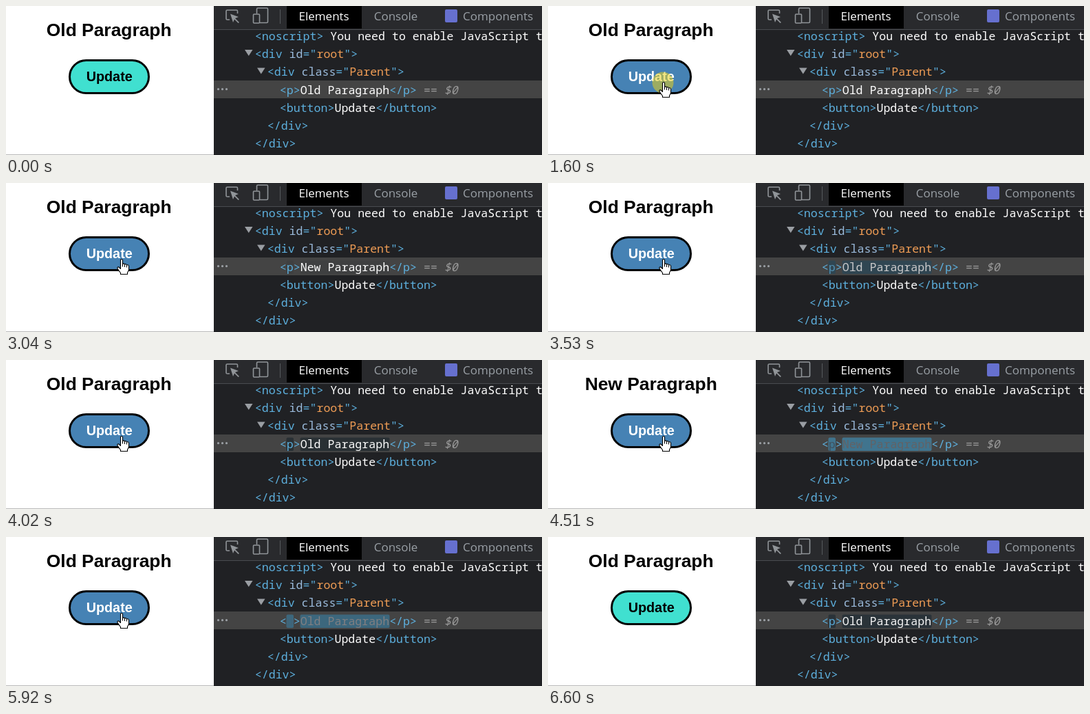
Write an HTML page that moves like this. It is 779 by 218 pixels and loops after 6670 ms.

```html
<!DOCTYPE html>
<html lang="en">
<head>
<meta charset="utf-8">
<title>Paragraph update</title>
<style>
  html, body { margin: 0; width: 100%; height: 100%; overflow: hidden; background: #fff; }
  svg { display: block; width: 779px; height: 218px; }
  text { white-space: pre; }
  .page { font-family: "Liberation Sans", Arial, sans-serif; font-weight: 700; text-anchor: middle; }
  .tab { font: 17px "Open Sans", "Noto Sans", sans-serif; fill: #9aa0a6; }
  .code { font: 16.6px "Noto Sans Mono", "DejaVu Sans Mono", monospace; fill: #fff; }
  .tag { fill: #5db0de; }
  .attr { fill: #9bbbdc; }
  .val { fill: #f09d55; }
  .dim { fill: #9a9a9a; }
  .icon { fill: none; stroke: #919599; stroke-width: 1.6; }
</style>
</head>
<body>
<svg viewBox="0 0 779 218">
  <rect width="779" height="218" fill="#fff"/>
  <rect y="217" width="302" height="1" fill="#b8b8b8"/>
  <text id="heading" class="page" x="149.7" y="44" font-size="26.4">Old Paragraph</text>
  <rect id="button" x="92.5" y="79.5" width="115" height="48" rx="24" stroke="#000" stroke-width="3"/>
  <text id="label" class="page" x="150.2" y="110" font-size="19.8">Update</text>

  <g id="tools">
    <rect x="302" width="477" height="218" fill="#202124"/>
    <rect x="302" width="477" height="34" fill="#292a2d"/>
    <rect x="302" y="34" width="477" height="1" fill="#494c50"/>
    <rect x="408" width="109" height="33" fill="#000"/>
    <g class="icon">
      <path d="M325 20H321.5Q320 20 320 18.5V7.5Q320 6 321.5 6H335Q336.5 6 336.5 7.5V11"/>
      <path d="M326 11.5L338 16L333 18L339 24L337.5 25L332 19.5L330 24Z" fill="#919599" stroke="none"/>
      <path d="M364.5 11V4.5Q364.5 3 366 3H379Q380.5 3 380.5 4.5V23Q380.5 24.5 379 24.500H369"/>
      <rect x="359.5" y="12" width="9" height="13" rx="1"/>
    </g>
    <rect x="398" y="5" width="1" height="21" fill="#55585c"/>
    <rect x="638" y="5" width="18" height="19" rx="2" fill="#6670cf"/>
    <text class="tab" x="425.5" y="21" style="fill:#fff">Elements</text>
    <text class="tab" x="534.7" y="21">Console</text>
    <text class="tab" x="664" y="21">Components</text>

    <rect x="302" y="109" width="477" height="26" fill="#444"/>
    <g fill="#9a9ea3">
      <circle cx="308.5" cy="121.7" r="1.6"/>
      <circle cx="314.5" cy="121.7" r="1.6"/>
      <circle cx="320.5" cy="121.7" r="1.6"/>
      <path d="M347 64H358.5L352.75 73Z"/>
      <path d="M365 90.500H376.5L370.75 99.5Z"/>
    </g>
    <g id="flash">
      <rect x="407.5" y="113.5" width="10.5" height="19.5" rx="2"/>
      <rect x="427.5" y="113.5" width="130" height="19.5" rx="2"/>
    </g>
    <g class="code">
      <text x="361.8" y="50"><tspan class="tag">&lt;noscript&gt;</tspan> You need to enable JavaScript to run</text>
      <text x="361.8" y="76" class="tag">&lt;div <tspan class="attr">id</tspan>="<tspan class="val">root</tspan>"&gt;</text>
      <text x="379.8" y="102" class="tag">&lt;div <tspan class="attr">class</tspan>="<tspan class="val">Parent</tspan>"&gt;</text>
      <text x="397.8" y="129"><tspan class="tag">&lt;</tspan><tspan id="name">p</tspan><tspan class="tag">&gt;</tspan><tspan id="node">Old Paragraph</tspan><tspan class="tag">&lt;/p&gt;</tspan><tspan class="dim"> == </tspan><tspan class="dim" font-style="italic">$0</tspan></text>
      <text x="397.8" y="155"><tspan class="tag">&lt;button&gt;</tspan>Update<tspan class="tag">&lt;/button&gt;</tspan></text>
      <text x="379.8" y="181" class="tag">&lt;/div&gt;</text>
      <text x="361.8" y="207" class="tag">&lt;/div&gt;</text>
    </g>
  </g>

  <circle id="press" cx="167" cy="112" r="15.5" fill="#e6d01e" fill-opacity=".55"/>
  <g id="cursor" fill="#fff" stroke="#000" stroke-width="1.1" stroke-linejoin="round">
    <path id="hand" d="M-1.5 1Q0 -1 1.5 1V7Q3.5 5.5 4.5 7.5Q6.5 6.5 7.5 8.5Q10 7.5 10.5 10V15Q10 18 8.5 19.5V22H-1.5V20Q-4 17 -6 13.5Q-6.5 11 -4 11.5L-1.5 14ZM1.5 7V11M4.5 7.5V11.5M7.5 8.5V12"/>
    <path id="arrow" d="M0 0V17L4 13.3L6.7 19.5L9.3 18.4L6.7 12.3H12Z"/>
  </g>
</svg>
<script>
const LOOP = 6670, STEP = 70;
const $ = id => document.getElementById(id);
const words = ["Old Paragraph", "New Paragraph"];

// press start, page update, inspector update
const clicks = [
  [1600, 1730, 1730],
  [2970, 3040, 3110],
  [4300, 4370, 4440],
  [5640, 5710, 5780]
];
const REST = [168, 111.5], AWAY = [214, 224];
const ENTER = [560, 1180], LEAVE = [6060, 6480];

const TEAL = [71, 135, 167], SLATE = [40, 46, 50], INK = [56, 56, 60];
const WHITE = [255, 255, 255], BLUE = [93, 176, 222];

const clamp = v => Math.min(1, Math.max(0, v));
const mix = (a, b, k) => a.map((v, i) => v + (b[i] - v) * k);
const rgb = c => `rgb(${c.map(Math.round)})`;
const show = (id, on) => $(id).setAttribute("visibility", on ? "visible" : "hidden");
const put = (id, s) => { if ($(id).textContent !== s) $(id).textContent = s; };
const hold = t => Math.floor(t / STEP) * STEP;
const smooth = k => k * k * (3 - 2 * k);

// cubic-bezier(0, 0, .2, 1)
function decel(x) {
  let lo = 0, hi = 1;
  for (let i = 0; i < 20; i++) {
    const s = (lo + hi) / 2;
    if (0.6 * s * s + 0.4 * s ** 3 < x) lo = s; else hi = s;
  }
  return smooth(lo);
}

function drawFlash(age) {
  const k = decel(clamp(age / 1120));
  const fade = 1 - decel(clamp((age - 1120) / 280));
  $("flash").setAttribute("fill", rgb(mix(TEAL, SLATE, k)));
  $("flash").setAttribute("opacity", fade);
  $("node").setAttribute("fill", rgb(mix(INK, WHITE, k)));
  $("name").setAttribute("fill", rgb(mix(INK, BLUE, k)));
}

function drawCursor(t) {
  const part = ([a, b]) => smooth(clamp((hold(t) - a + STEP / 2) / (b - a)));
  const near = part(ENTER) - part(LEAVE);
  const [x, y] = mix(AWAY, REST, near);
  const over = x > 92 && x < 208 && y > 78 && y < 128;
  $("cursor").setAttribute("transform", `translate(${x} ${y})`);
  show("cursor", near > 0);
  $("hand").style.display = over ? "" : "none";
  $("arrow").style.display = over ? "none" : "";
  $("button").setAttribute("fill", over ? "#4682b4" : "#40e0d0");
  $("label").setAttribute("fill", over ? "#fff" : "#000");
}

function draw(t) {
  const page = clicks.filter(c => t >= c[1]).length;
  const seen = clicks.filter(c => t >= c[2]);
  put("heading", words[page % 2]);
  put("node", words[seen.length % 2]);
  drawFlash(seen.length ? hold(t - seen[seen.length - 1][2]) : LOOP);
  show("press", clicks.some(c => t >= c[0] && t < c[1]));
  drawCursor(t);
}

const start = performance.now();
function tick() {
  draw((performance.now() - start) % LOOP);
  requestAnimationFrame(tick);
}
tick();
</script>
</body>
</html>
```
